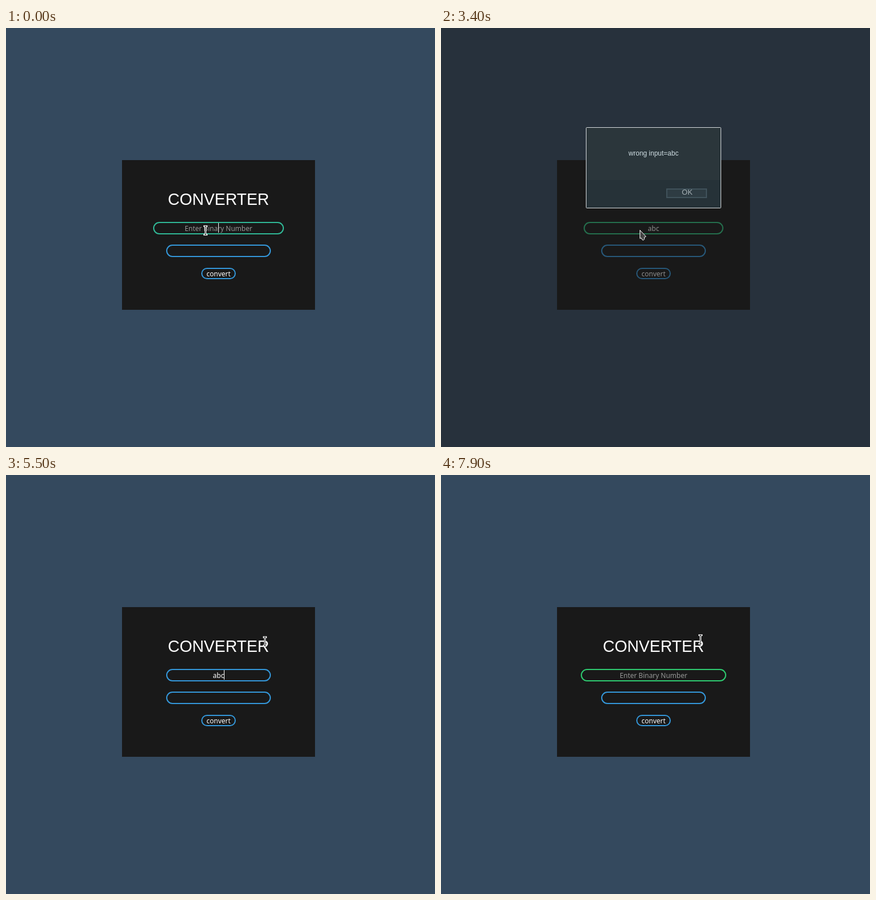
Write an HTML page that moves like this. It is 758 px wide and 739 px high and loops after 8000 ms.

```html
<!DOCTYPE html>
<html lang="en">
<head>
<meta charset="utf-8">
<title>Converter</title>
<style>
  html, body { margin: 0; width: 100%; height: 100%; overflow: hidden; background: #34495e; }
  svg { display: block; width: 100%; height: 100%; }
  text { font: 12px "Noto Sans", "Open Sans", sans-serif; fill: #fff; }
  .mid { text-anchor: middle; }
  .sans { font-family: "Liberation Sans", Arial, sans-serif; }
  .pill { fill: none; stroke: #3498db; stroke-width: 2; }
</style>
</head>
<body>
<svg viewBox="0 0 758 739">
  <rect width="758" height="739" fill="#34495e"/>
  <rect x="205" y="233" width="341" height="264" fill="#191919"/>
  <text class="mid sans" x="375.5" y="312" style="font-size:28.6px">CONVERTER</text>
  <rect id="field" class="pill" y="343" height="20" rx="10"/>
  <text id="value" class="mid" x="375.5" y="358"></text>
  <rect id="caret" y="344" width="1" height="17" fill="#fff"/>
  <rect class="pill" x="284" y="383" width="183" height="20" rx="10"/>
  <rect class="pill" x="346" y="424" width="59" height="18" rx="9"/>
  <text class="mid" x="375.5" y="438">convert</text>

  <g id="list">
    <rect id="listBox" x="247.5" y="363.5" width="256" fill="#2a353a" stroke="#263238"/>
    <g id="items"></g>
  </g>

  <g id="dialog">
    <rect width="758" height="739" fill="#1a1a1a" opacity=".5"/>
    <rect x="256.5" y="175.5" width="238" height="142" rx="1" fill="#2b363b" stroke="#d9dddf"/>
    <rect x="257" y="268" width="237" height="49" fill="#263238"/>
    <text class="mid sans" x="375.5" y="225" style="fill:#cfdde2">wrong input=abc</text>
    <rect x="399" y="284" width="70" height="15" fill="#2e3c43" stroke="#40525b" stroke-width="2"/>
    <text class="mid sans" x="435" y="294" style="font-size:13px;fill:#a9b4b8">OK</text>
  </g>

  <path id="arrow" d="M.5 .5L11.2 11.8L8.3 13V16.5L6.5 18.3L4.5 17.5L3.2 14.5L.5 15.2Z"
        fill="#444" stroke="#fff" stroke-linejoin="round"/>
  <g id="beam" fill="none">
    <path d="M-2 -7.5H2M0 -7.5V7.5M-2 7.5H2" stroke="#fff" stroke-width="3" stroke-linecap="square"/>
    <path d="M-2 -7.5H2M0 -7.5V7.5M-2 7.5H2" stroke="#222"/>
  </g>
</svg>
<script>
const LOOP = 8000, MID = 375.5;
const $ = id => document.getElementById(id);
const show = (id, on) => $(id).setAttribute('display', on ? 'inline' : 'none');
const set = (id, attrs) => {
  for (const k in attrs) $(id).setAttribute(k, attrs[k]);
};

// Latest value whose start time has passed.
const at = (t, keys) => {
  let value = keys[0][1];
  for (const [start, v] of keys) if (t >= start) value = v;
  return value;
};

const values = [[0, ''], [900, 'a'], [1900, 'ab'], [2200, 'abc'], [6700, 'ab'], [6900, 'a'], [7100, '']];
const carets = [[0, 1], [400, 0], [900, 1], [1200, 0], [1900, 1], [2400, 0],
  [5500, 1], [5800, 0], [6700, 1], [6800, 0], [7100, 1], [7900, 0]];
const focus = [[0, .64], [100, .972], [400, 1], [3400, .86], [3500, .15], [3600, 0],
  [5600, .66], [5700, .97], [5800, 1]];
const history = ['asd', 'as', 'ad', 'aa'];
const lists = [[0, []], [1000, history], [2000, []], [6800, ['abc']],
  [7000, ['abc', ...history]], [7100, []]];
const pointer = [
  [0, ['beam', 352.5, 357]], [3400, ['arrow', 351, 356]],
  [4200, ['arrow', 430, 320]], [4300, ['arrow', 473, 300]],
  [4500, ['arrow', 469, 299]], [4600, ['arrow', 475, 298]],
  [5000, ['arrow', 470, 296]], [5100, ['arrow', 461, 293]], [5200, ['arrow', 456.5, 292]],
  [5500, ['beam', 457.5, 293.5]], [6200, ['beam', 458.5, 290]],
  [6800, ['arrow', 457, 289]], [7100, ['beam', 458.5, 290]]
];
const caretX = { '': 375, a: 379, ab: 382, abc: 385 };

const blue = [52, 152, 219], green = [46, 204, 113];
const mix = p => `rgb(${blue.map((c, i) => Math.round(c + (green[i] - c) * p))})`;

function drawList(entries) {
  show('list', entries.length);
  set('listBox', { height: entries.length * 18 + 3 });
  const html = entries.map((s, i) =>
    `<text x="253" y="${380 + 18 * i}" style="fill:#b8c4c9">${s}</text>`).join('');
  if ($('items').innerHTML !== html) $('items').innerHTML = html;
}

function draw(t) {
  const p = at(t, focus), width = 183 + 72 * p;
  set('field', { x: MID - width / 2, width });
  $('field').style.stroke = mix(p);

  const value = at(t, values);
  $('value').textContent = value || 'Enter Binary Number';
  $('value').style.opacity = value ? 1 : .54;
  set('caret', { x: caretX[value] });
  show('caret', at(t, carets));

  drawList(at(t, lists));
  show('dialog', t >= 3400 && t < 5500);

  const [shape, x, y] = at(t, pointer);
  show('arrow', shape === 'arrow');
  show('beam', shape === 'beam');
  set(shape, { transform: `translate(${x} ${y})` });
}

const begin = performance.now();
function tick() {
  draw((performance.now() - begin) % LOOP);
  requestAnimationFrame(tick);
}
tick();
</script>
</body>
</html>
```
